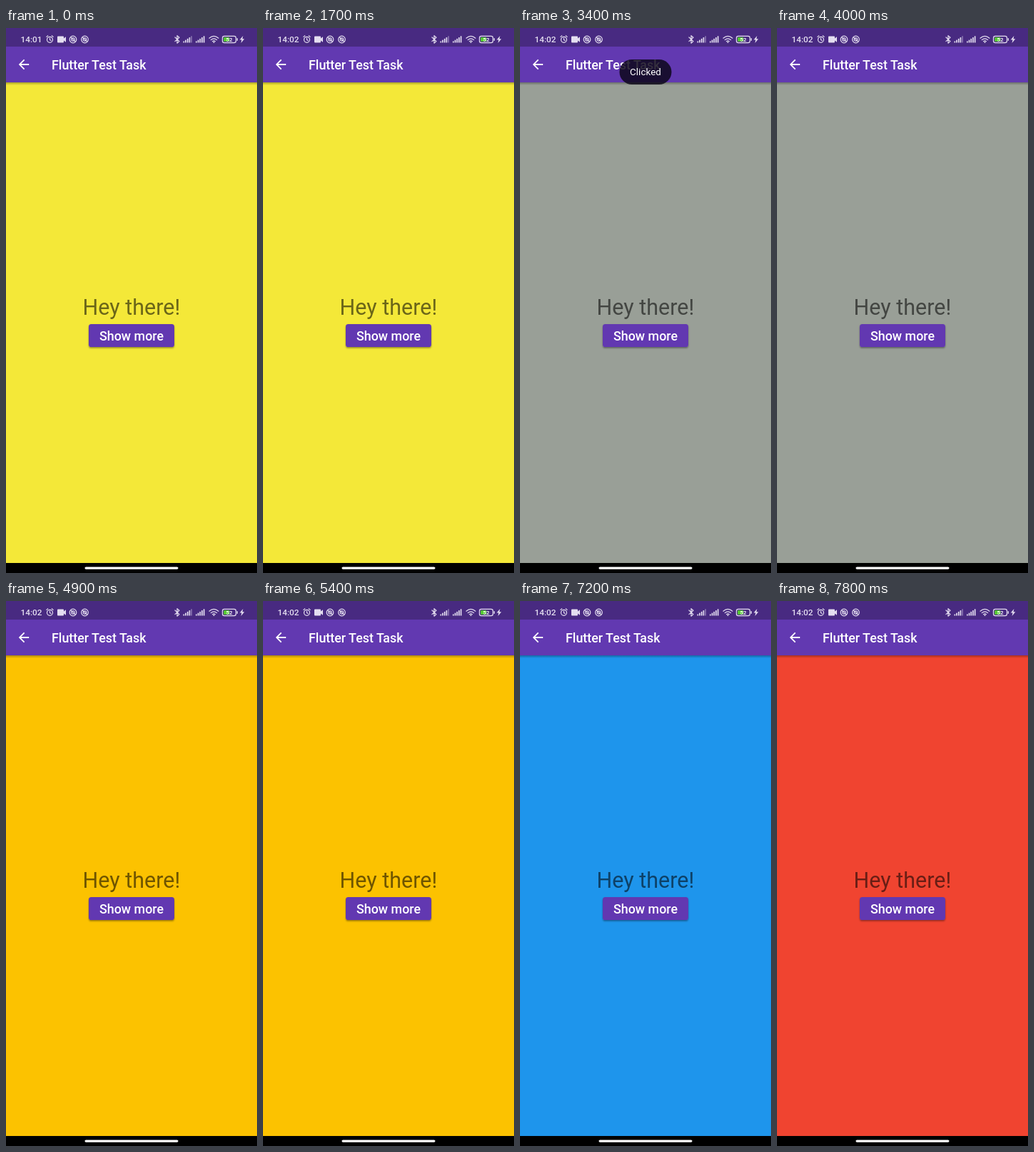
Write an HTML page that moves like this. It is 352x762 px and loops after 8000 ms.

```html
<!DOCTYPE html>
<html lang="en">
<head>
<meta charset="utf-8">
<style>
  html, body { margin: 0; width: 100%; height: 100%; overflow: hidden; background: #000; }
  svg { display: block; width: 352px; height: 762px; font-family: Roboto, "Noto Sans", sans-serif; }
  .line { fill: none; stroke: #e4def0; stroke-width: 1.2; stroke-linecap: round; stroke-linejoin: round; }
  .medium { font-weight: 500; }
</style>
</head>
<body>
<svg viewBox="0 0 352 762" fill="#fff">
  <defs>
    <filter id="shade" x="-20%" y="-40%" width="140%" height="200%">
      <feDropShadow dx="0" dy="1.5" stdDeviation="1.3" flood-opacity=".4"/>
    </filter>
    <linearGradient id="edge" x2="0" y2="1">
      <stop stop-opacity=".3"/>
      <stop offset="1" stop-opacity="0"/>
    </linearGradient>
    <g id="ring" class="line">
      <circle r="4.8"/>
      <circle r="2.2"/>
      <path d="M-3.2-3.2L3.2 3.2"/>
    </g>
  </defs>

  <rect id="page" width="352" height="748"/>
  <rect y="76" width="352" height="4" fill="url(#edge)"/>
  <rect width="352" height="76" fill="#6239b1"/>
  <rect width="352" height="26" fill="#482a81"/>

  <g fill="#e4def0">
    <text id="clock" class="medium" x="20.5" y="20" font-size="11.8"></text>
    <g class="line">
      <circle cx="61.5" cy="16.3" r="4"/>
      <path d="M61.5 14v2.5l1.6 1M56.8 12.4l2-1.6M66.2 12.4l-2-1.6"/>
    </g>
    <path d="M73 11.5h7q1 0 1 1v2l3-2.3v7.6l-3-2.3v2q0 1-1 1h-7q-1 0-1-1v-7q0-1 1-1z"/>
    <use href="#ring" x="94" y="16"/>
    <use href="#ring" x="110.5" y="16"/>
    <path class="line" d="M237 13l6 5.6-3 2.6V10.6l3 2.6-6 5.4"/>
    <g id="bars"></g>
    <path class="line" stroke-width="1.5" d="M285 14.2q6.5-5.6 13 0M287.3 16.6q4.2-3.6 8.4 0M289.5 18.7q2-1.6 4 0"/>
    <circle cx="291.5" cy="20" r="1"/>
    <rect class="line" x="303.5" y="11.3" width="19" height="9.4" rx="2.6"/>
    <rect x="305.2" y="13" width="8.2" height="6" rx="1" fill="#55c932"/>
    <rect x="323.6" y="14" width="1.4" height="4" rx=".7"/>
    <text class="medium" x="313" y="19" font-size="8" text-anchor="middle" fill="#fff">52</text>
    <path d="M332.4 11l-4.6 5.6h2.7l-1 4.4 4.8-5.8h-2.8z"/>
  </g>

  <path transform="translate(14.25 40.25) scale(.896)" d="M20 11H7.83l5.59-5.59L12 4l-8 8 8 8 1.41-1.41L7.83 13H20z"/>
  <text class="medium" x="64" y="57.7" font-size="17.9">Flutter Test Task</text>

  <text x="176" y="401.3" font-size="30.5" text-anchor="middle" fill="#000" fill-opacity=".56">Hey there!</text>
  <rect x="116" y="414" width="120" height="32" rx="3.6" fill="#6239b1" filter="url(#shade)"/>
  <text class="medium" x="176" y="436.5" font-size="17.9" text-anchor="middle">Show more</text>

  <g id="toast">
    <rect x="139.5" y="44" width="73" height="35" rx="17.5" fill="#0c0618" fill-opacity=".83"/>
    <text x="176" y="66.3" font-size="13.5" text-anchor="middle">Clicked</text>
  </g>

  <rect y="748" width="352" height="14" fill="#000"/>
  <rect x="110.5" y="753.5" width="131" height="3.2" rx="1.6"/>
</svg>
<script>
  const LOOP = 8000;
  const $ = id => document.getElementById(id);
  const taps = [
    [0, "#f4e838"], [2700, "#999f97"], [4300, "#fcc200"],
    [5600, "#1e95ec"], [7300, "#f04430"]
  ];
  const clamp = v => Math.min(1, Math.max(0, v));

  const signal = (x, weak) => [0, 1, 2, 3, 4].map(i => {
    const h = 2 + i * 1.8;
    return `<rect x="${x + i * 2.7}" y="${20.5 - h}" width="1.7" height="${h}" opacity="${weak && i > 3 ? .4 : 1}"/>`;
  }).join("");
  $("bars").innerHTML = signal(248.5, true) + signal(266, false);

  function draw(t) {
    $("page").setAttribute("fill", taps.filter(([at]) => at <= t).pop()[1]);
    $("clock").textContent = t < 1000 ? "14:01" : "14:02";
    $("toast").setAttribute("opacity", Math.min(clamp((t - 1850) / 150), clamp((3990 - t) / 150)));
  }

  const start = performance.now();
  function tick() {
    draw((performance.now() - start) % LOOP);
    requestAnimationFrame(tick);
  }
  draw(0);
  requestAnimationFrame(tick);
</script>
</body>
</html>
```
